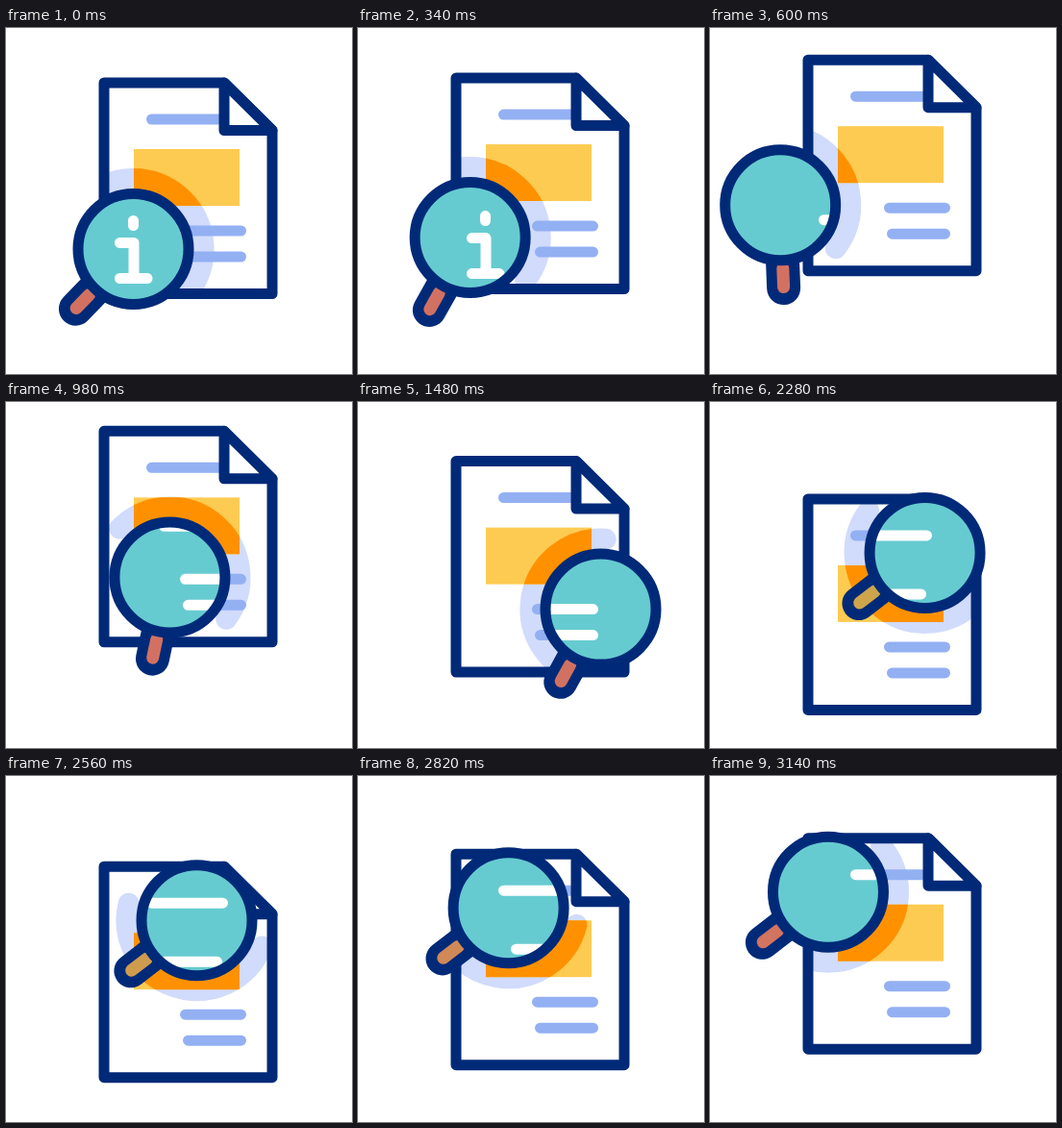
Animation of 360x360 px, one loop 3.16 s. Source, as an HTML page:

```html
<!DOCTYPE html>
<html lang="en">
<head>
<meta charset="utf-8">
<title>Document search</title>
<style>
  html, body { margin: 0; width: 100%; height: 100%; overflow: hidden; background: #fff; }
  svg { display: block; width: 100%; height: 100%; }
  .line { fill: none; stroke: #002a78; stroke-width: 11; stroke-linejoin: round; stroke-linecap: round; }
  .rows { fill: none; stroke-width: 11; stroke-linecap: round; stroke-linejoin: round; }
  .halo { fill: none; stroke-width: 22; stroke-linecap: round; }
</style>
</head>
<body>
<svg viewBox="0 0 360 360">
  <defs>
    <path id="sheet" d="M102 0H227L277 49.5V219.5H102Z"/>
    <path id="rows" d="M151.5 38H225.5M186.5 154H244.5M189.5 181H244.5"/>
    <path id="arc"/>
    <clipPath id="page"><use href="#sheet"/></clipPath>
    <clipPath id="block"><rect x="133" y="69" width="110" height="59"/></clipPath>
    <clipPath id="glass"><circle class="lens" r="52.5"/></clipPath>
  </defs>

  <g class="doc">
    <use href="#sheet" fill="#fff"/>
    <g clip-path="url(#page)"><use href="#arc" class="halo" stroke="#d1dbfb"/></g>
    <use href="#rows" class="rows" stroke="#93b0f3"/>
    <rect x="133" y="69" width="110" height="59" fill="#fecb52"/>
    <g clip-path="url(#block)"><use href="#arc" class="halo" stroke="#ff9100"/></g>
    <use href="#sheet" class="line"/>
    <path class="line" d="M227 0V49.5H277Z" style="fill:#fff"/>
  </g>

  <g class="lens">
    <g id="handle" stroke-linecap="round">
      <path d="M58 0H86.5" stroke="#002a78" stroke-width="35"/>
      <path id="grip" d="M66 0H85.5" stroke-width="13"/>
    </g>
    <circle r="57.5" fill="#66cbd0"/>
  </g>

  <!-- What the glass reveals -->
  <g clip-path="url(#glass)">
    <g class="doc" stroke="#fff">
      <use href="#rows" class="rows"/>
      <path class="rows" d="M164.5 99H219.5"/>
      <path id="info" class="rows" d="M132.5 143.5v5M118.5 166.5H133V203.5M118.5 203.5H147"/>
    </g>
  </g>
  <circle class="lens line" r="57.5"/>
</svg>
<script>
  const LOOP = 3160, STEP = 20;
  const $ = id => document.getElementById(id);

  // Key poses as [time, value], joined by a sine ease
  const moves = {
    page: [[180, 57], [780, 27], [2240, 101], [3480, 57]],
    x: [[180, 132.5], [650, 71.5], [1273, 252.5], [1480, 252.5], [2240, 224], [3200, 122]],
    y: [[180, 173], [600, 151], [1480, 154], [2280, 56]],
    tilt: [[180, 134], [600, 87.7], [980, 102], [2100, 142.5]],
    shine: [[940, 312], [1480, 188], [2820, 100], [3140, 45]],
    info: [[620, 1], [800, 0]],
    amber: [[1480, 0], [2280, 1], [3300, 0]]
  };

  const ease = u => (1 - Math.cos(Math.PI * u)) / 2;
  const mix = (a, b, u) => a + (b - a) * u;

  function sample(keys, t) {
    const i = keys.findIndex(([time]) => time > t);
    if (i === 0) return keys[0][1];
    if (i < 0) return keys[keys.length - 1][1];
    const [t0, a] = keys[i - 1], [t1, b] = keys[i];
    return mix(a, b, ease((t - t0) / (t1 - t0)));
  }

  function polar(r, deg) {
    const a = deg * Math.PI / 180;
    return `${r * Math.cos(a)} ${r * Math.sin(a)}`;
  }
  const R = 73, SPAN = 86;
  $("arc").setAttribute("d", `M${polar(R, -SPAN)}A${R} ${R} 0 0 1 ${polar(R, SPAN)}`);

  function place(selector, transform) {
    for (const el of document.querySelectorAll(selector)) el.setAttribute("transform", transform);
  }

  function draw(t) {
    const p = {};
    for (const name in moves) p[name] = sample(moves[name], t);
    place(".doc", `translate(0 ${p.page})`);
    place(".lens", `translate(${p.x} ${p.page + p.y})`);
    place("#arc", `translate(${p.x} ${p.y}) rotate(${p.shine})`);
    place("#handle", `rotate(${p.tilt})`);
    $("info").setAttribute("opacity", p.info);
    $("grip").setAttribute("stroke",
      `rgb(${mix(210, 206, p.amber)}, ${mix(113, 165, p.amber)}, ${mix(97, 74, p.amber)})`);
  }

  const start = performance.now();
  function tick() {
    const t = (performance.now() - start) % LOOP;
    draw(Math.floor(t / STEP) * STEP);
    requestAnimationFrame(tick);
  }
  draw(0);
  requestAnimationFrame(tick);
</script>
</body>
</html>
```
